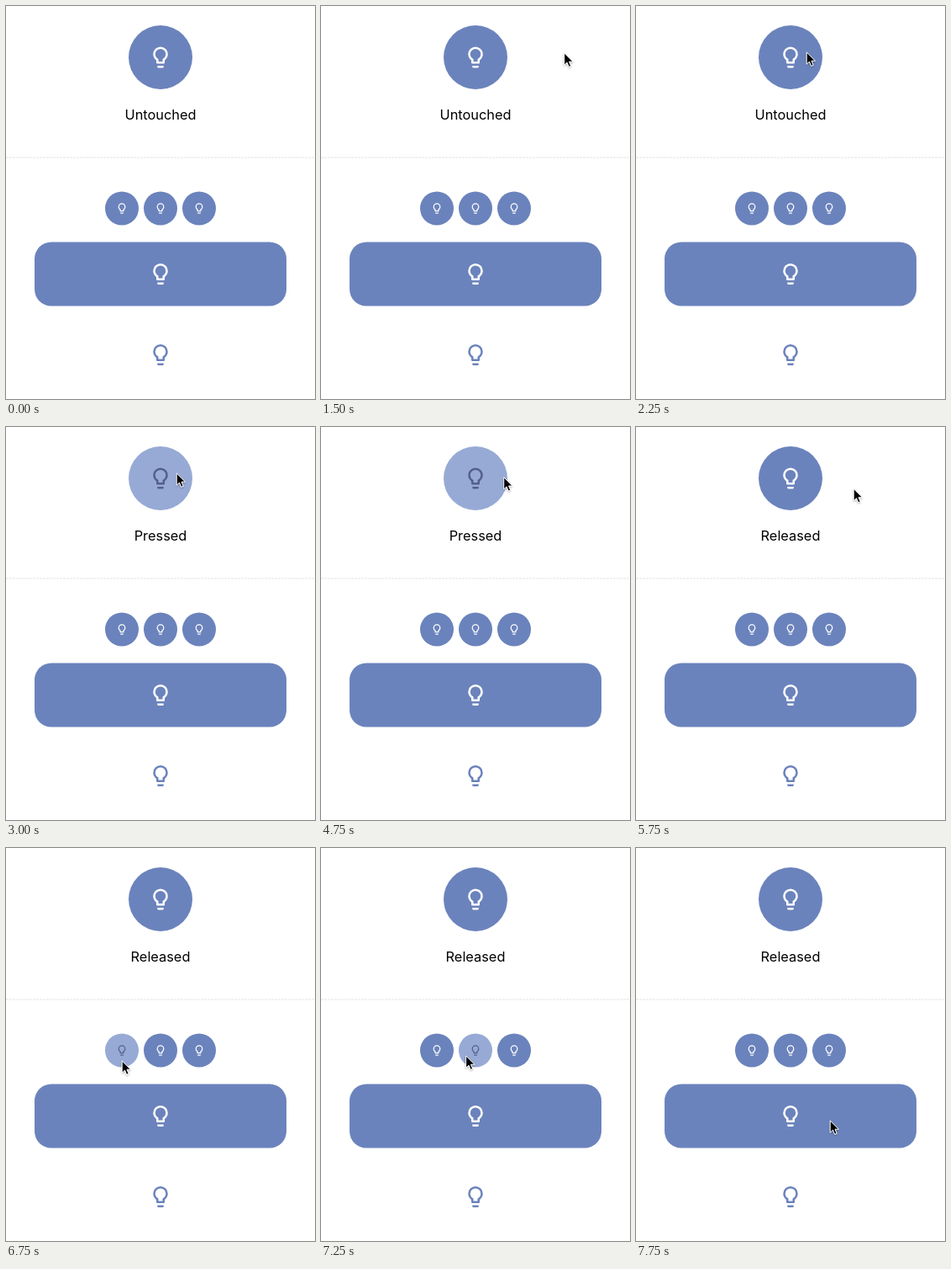
An HTML page for the animation above (8000 ms loop, 368 px wide and 467 px high).

```html
<!DOCTYPE html>
<html lang="en">
<head>
<meta charset="utf-8">
<title>Touch buttons</title>
<style>
  html, body { margin: 0; width: 100%; height: 100%; overflow: hidden; background: #fff; }
  svg { display: block; width: 368px; height: 467px; }
  text { font: 16.35px Inter, sans-serif; text-anchor: middle; }
  .btn { fill: #6b83bc; color: #fff; }
  .btn.down { fill: #97aad5; color: #53608a; }
  use { fill: currentColor; }
</style>
</head>
<body>
<svg viewBox="0 0 368 467">
  <defs>
    <path id="bulb" transform="translate(-12 -12)" d="M12 2A7 7 0 0 1 19 9C19 11.38 17.81 13.47 16 14.74V17A1 1 0 0 1 15 18H9A1 1 0 0 1 8 17V14.74C6.19 13.47 5 11.38 5 9A7 7 0 0 1 12 2M9 21V20H15V21A1 1 0 0 1 14 22H10A1 1 0 0 1 9 21M12 4A5 5 0 0 0 7 9C7 11.05 8.23 12.81 10 13.58V16H14V13.58C15.77 12.81 17 11.05 17 9A5 5 0 0 0 12 4Z"/>
    <filter id="shade" x="-50%" y="-50%" width="200%" height="200%">
      <feDropShadow dx="0" dy="1" stdDeviation="0.8" flood-opacity="0.35"/>
    </filter>
  </defs>
  <rect width="368" height="467" fill="#fff"/>
  <g id="buttons"></g>
  <text id="label" x="184" y="135"></text>
  <path d="M0 180H368" stroke="#e4e4e4" stroke-width="1.2" stroke-dasharray="3 1"/>
  <g color="#6b83bc"><use href="#bulb" transform="translate(184 414.5) scale(1.25)"/></g>
  <path id="cursor" d="M.7 .9V15.2L4 12.1L6.2 17.3L8.7 16.3L6.5 11.2H11Z" stroke="#fff" stroke-linejoin="round" filter="url(#shade)"/>
</svg>
<script>
const LOOP = 8000, STEP = 250;
const $ = id => document.getElementById(id);

const button = (shape, x, y, scale) =>
  `<g class="btn">${shape}<use href="#bulb" transform="translate(${x} ${y}) scale(${scale})"/></g>`;
const round = (x, y, r) =>
  button(`<circle cx="${x}" cy="${y}" r="${r}"/>`, x, y, r > 30 ? 1.25 : 0.625);

$('buttons').innerHTML =
  round(184, 61, 38) +
  [-46, 0, 46].map(dx => round(184 + dx, 240.5, 20)).join('') +
  button('<rect x="34" y="280.5" width="300" height="76" rx="20"/>', 184, 318.5, 1.25);
const buttons = [...$('buttons').children];

// The pointer enters, then eases to each resting place
const enter = { at: 1500, x: 289, y: 55 };
const moves = [
  { end: 1750, steps: 1, x: 211, y: 52 },
  { end: 2000, steps: 1, x: 202.5, y: 54 },
  { end: 5250, steps: 3, x: 258.5, y: 72.5 },
  { end: 6250, steps: 1, x: 219, y: 176 },
  { end: 6500, steps: 1, x: 150, y: 246 },
  { end: 6750, steps: 1, x: 137.5, y: 252 },
  { end: 7500, steps: 3, x: 184, y: 244 },
  { end: 7750, steps: 1, x: 230.5, y: 323 }
];

const presses = [
  { button: 0, from: 3000, to: 5750 },
  { button: 1, from: 6750, to: 7000 },
  { button: 2, from: 7250, to: 7500 }
];

const ease = u => u * u * (3 - 2 * u);
const clamp = u => Math.min(1, Math.max(0, u));

function pointerAt(t) {
  let { x, y } = enter;
  for (const m of moves) {
    const k = ease(clamp(1 + (t - m.end) / (m.steps * STEP)));
    x += (m.x - x) * k;
    y += (m.y - y) * k;
  }
  return { x, y };
}

function draw(time) {
  const t = Math.floor(time / STEP) * STEP;
  const { x, y } = pointerAt(t);
  $('cursor').style.display = t < enter.at ? 'none' : '';
  $('cursor').setAttribute('transform', `translate(${x} ${y})`);

  buttons.forEach((b, i) => b.classList.toggle('down',
    presses.some(p => p.button === i && t >= p.from && t < p.to)));

  const { from, to } = presses[0];
  $('label').textContent = t < from ? 'Untouched' : t < to ? 'Pressed' : 'Released';
}

function tick() {
  draw(performance.now() % LOOP);
  requestAnimationFrame(tick);
}
tick();
</script>
</body>
</html>
```
